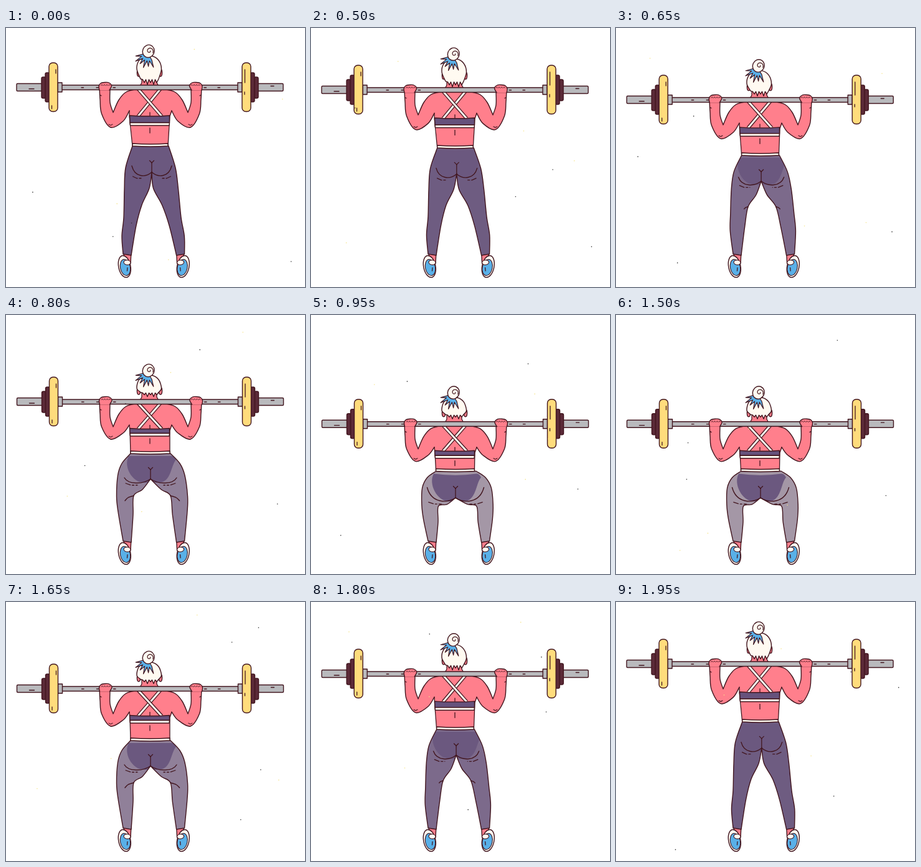
An HTML page with a canvas that plays this animation: 480 by 417 pixels, repeating every 2100 ms.

```html
<!DOCTYPE html>
<html lang="en">
<head>
<meta charset="utf-8">
<title>Barbell squat</title>
<style>
html, body { margin: 0; width: 100%; height: 100%; overflow: hidden; background: #fff; }
canvas { display: block; width: 480px; height: 417px; }
</style>
</head>
<body>
<canvas id="stage"></canvas>
<script>
const canvas = document.getElementById('stage');
const ctx = canvas.getContext('2d');
const ratio = window.devicePixelRatio || 1;
canvas.width = 480 * ratio;
canvas.height = 417 * ratio;

const INK = '#42161f', PINK = '#ff7f8c', CREAM = '#fffaf1', BLUE = '#59b0e8';
const GREY = '#b9babd', YELLOW = '#ffdc7c', PLATE = '#5b2a38', PURPLE = '#66527c';
const BAR_Y = 95.5, TRAVEL = 100, HALF = 0.44;
const BODY_AXIS = 232, BAR_AXIS = 231, FOOT_AXIS = 237.3;

// Depth of the squat for each held pose, top to bottom.
const DEPTHS = [0, 0.04, 0.2, HALF, 0.797, 1];

// Left leg outlines: waist to ankle outside, ankle to crotch inside.
const standing = {
  leg: [107, 88, 127], glute: [32, 10], crotch: [234, 232],
  outer: [203, 190, 192, 225, 190, 260, 189, 305, 186, 335, 188, 364],
  inner: [201, 366, 209, 318, 218, 285, 230, 258]
};
const halfway = {
  leg: [144, 128, 153], glute: [42, 2], crotch: [232, 264],
  outer: [200, 223, 186, 239, 179.5, 258, 177.5, 292, 180, 317, 188, 364],
  inner: [201, 366, 204, 322, 205, 291, 219, 281]
};
const deep = {
  leg: [179, 168, 176], glute: [48, 27], crotch: [232, 316],
  outer: [201, 272, 187, 278, 178, 293, 178, 315, 181, 338, 188, 364],
  inner: [201, 366, 204, 342, 204, 320, 218, 322]
};

function mix(a, b, t) {
  if (typeof a === 'number') return a + (b - a) * t;
  if (Array.isArray(a)) return a.map((v, i) => mix(v, b[i], t));
  return Object.fromEntries(Object.keys(a).map(k => [k, mix(a[k], b[k], t)]));
}

function polyline(path, p) {
  for (let i = 0; i < p.length; i += 2) path.lineTo(p[i], p[i + 1]);
  return path;
}
// Smooth curve through all points, joined to whatever the path holds.
function curve(path, p) {
  const n = p.length / 2;
  const at = i => { const k = Math.max(0, Math.min(n - 1, i)) * 2; return [p[k], p[k + 1]]; };
  path.lineTo(p[0], p[1]);
  for (let i = 0; i < n - 1; i++) {
    const [a, b, c, d] = [at(i - 1), at(i), at(i + 1), at(i + 2)];
    path.bezierCurveTo(b[0] + (c[0] - a[0]) / 6, b[1] + (c[1] - a[1]) / 6,
      c[0] - (d[0] - b[0]) / 6, c[1] - (d[1] - b[1]) / 6, c[0], c[1]);
  }
  return path;
}
function paint(path, fill, width = 1.4) {
  if (fill) { ctx.fillStyle = fill; ctx.fill(path); }
  if (width) { ctx.lineWidth = width; ctx.strokeStyle = INK; ctx.stroke(path); }
}
const poly = (p, fill, width) => { const s = polyline(new Path2D(), p); s.closePath(); paint(s, fill, width); };
const stroke = (p, width) => paint(curve(new Path2D(), p), null, width);
const line = (...p) => paint(polyline(new Path2D(), p), null, 1.3);
function box(x, y, w, h, r, fill) {
  const s = new Path2D();
  s.roundRect(x, y, w, h, r);
  paint(s, fill);
}
function oval(x, y, rx, ry, tilt, fill, width) {
  const s = new Path2D();
  s.ellipse(x, y, rx, ry, tilt, 0, 2 * Math.PI);
  paint(s, fill, width);
}
function bothSides(axis, draw) {
  draw();
  ctx.save();
  ctx.translate(2 * axis, 0);
  ctx.scale(-1, 1);
  draw();
  ctx.restore();
}
// The line of symmetry drifts from the hips to the feet.
function axisAt(y) {
  return mix(BODY_AXIS, FOOT_AXIS, Math.max(0, Math.min(1, (y - 225) / 140)));
}
function mirrored(p) {
  const out = [];
  for (let i = p.length - 2; i >= 0; i -= 2) out.push(2 * axisAt(p[i + 1]) - p[i], p[i + 1]);
  return out;
}

function foot() {
  poly([189, 360, 201, 360, 200, 379, 190, 379], PINK);
  oval(190.3, 384, 9.6, 17.8, -0.2, CREAM);
  oval(191.5, 385.5, 8, 13.2, -0.2, BLUE, 1.1);
  oval(194.5, 377.5, 5.5, 3.8, 0.15, CREAM, 1.2);
  line(195, 386, 194.5, 391);
}

function legs(pose, bend) {
  const rgb = c => `rgb(${c.map(Math.round)})`;
  const { outer, inner, crotch: [cx, cy], glute: [wide, high] } = pose;
  const [left, waist] = outer, right = 2 * BODY_AXIS - left - 1;

  const body = curve(new Path2D(), outer);
  curve(body, [...inner, cx, cy]);
  curve(body, [cx, cy, ...mirrored(inner)]);
  curve(body, mirrored(outer));
  body.closePath();
  paint(body, rgb(pose.leg), 0);

  const patch = new Path2D(), top = waist + 4;
  patch.moveTo(cx - 35, top);
  patch.bezierCurveTo(cx - 44, top + 16, cx - 30, cy + 6, cx - 10, cy + 6);
  patch.lineTo(cx + 12, cy + 6);
  patch.bezierCurveTo(cx + 34, cy + 6, cx + 32, top + 16, cx + 41, top + 6);
  patch.quadraticCurveTo(cx + 38, top, cx + 34, top);
  patch.quadraticCurveTo(cx, top + 8 * Math.max(0, bend - 1), cx - 35, top);
  ctx.save();
  ctx.clip(body);
  paint(patch, rgb(standing.leg), 0);
  ctx.restore();
  paint(body);

  for (const side of [-1, 1]) {
    const w = side * wide, fold = new Path2D();
    fold.moveTo(cx, cy);
    fold.bezierCurveTo(cx + 0.3 * w, cy + 9, cx + 0.85 * w, cy + 9, cx + w, cy - high);
    paint(fold);
    ctx.setLineDash([8, 3, 3, 3]);
    line(cx + 0.95 * w, cy + 7, cx + 0.75 * w, cy + 10, cx + 0.5 * w, cy + 10);
    ctx.setLineDash([]);
    line(cx, cy - 15, cx + side * 3.5, cy - 18.5);
  }
  line(cx, cy, cx, cy - 15);

  if (bend > 0.2 && bend <= 1) {
    const [x, y] = inner.slice(4);
    const crease = [x, y, x - 9 * bend, y + 3 * bend, x - 14 * bend, y + 8 * bend];
    stroke(crease);
    stroke(mirrored(crease));
  }

  const band = new Path2D();
  band.moveTo(left, waist - 4);
  band.quadraticCurveTo(BODY_AXIS, waist - 2, right, waist - 4);
  band.lineTo(right, waist);
  band.quadraticCurveTo(BODY_AXIS, waist + 2, left, waist);
  band.closePath();
  paint(band, CREAM);
}

function torso(squat, left, hip) {
  const right = 2 * BODY_AXIS - left - 1, lift = -4 * squat;
  poly([213, 97, 251, 97, 256, 102, 267, 134, 263, 142, right, hip, left, hip, 199, 142, 197, 134, 208, 102], PINK, 0);
  line(198, 133, 198 + squat, 142, left, hip);
  line(266, 133, 263, 142, right, hip);
  bothSides(BODY_AXIS, () => {
    const arm = curve(new Path2D(), [212, 98, 193, 103, 181, 116, 172, 136]);
    curve(arm, [172, 136, 167, 120, 167, 99]);
    curve(arm, [150, 96, 151, 115, 153.5, 138 + lift / 2, 168, 160 + lift, 188, 150 + lift, 198, 133]);
    paint(arm, PINK);
    stroke([165, 155 + lift, 168, 156.5 + lift, 171, 155 + lift], 1.1);
    line(151, 108, 153, 109);
  });
}

function bra(squat) {
  const top = 141 - 2.5 * squat, seam = 152.5 - 6 * squat, bottom = seam + 4.5;
  ctx.lineCap = 'butt';
  for (const side of [-1, 1]) {
    ctx.beginPath();
    ctx.moveTo(230 - side * 18, 98);
    ctx.lineTo(231 + side * 19, top + 1);
    ctx.strokeStyle = INK; ctx.lineWidth = 5.6; ctx.stroke();
    ctx.strokeStyle = CREAM; ctx.lineWidth = 3; ctx.stroke();
  }
  ctx.lineCap = 'round';
  line(231, top - 5, 231, top);
  poly([198.5, top, 215, top + 1, 247, top + 1, 262.5, top, 262.5, seam, 199, seam], PURPLE);
  poly([199, seam, 262.5, seam, 262, bottom, 199.5, bottom], CREAM);
  line(231, bottom + 4, 231, bottom + 12);
}

function head(squat) {
  const drop = 8 * squat, nape = 83 - 1.5 * squat;
  poly([219, 78, 242, 78, 242, 88, 247, 99, 213, 99, 218, 88], PINK, 0);
  line(218, 80, 218, 88, 213, 97);
  line(242, 80, 242, 88, 247, 97);
  for (const x of [213, 248]) oval(x, 72 + 0.75 * drop, 2.6, 6, 0, PINK);

  const hair = curve(new Path2D(), [216, nape - 1, 210, 66 + drop, 213, 53 + drop, 222, 46 + drop,
    234, 45 + drop, 245, 52 + drop, 249.5, 66 + drop, 245, nape - 1]);
  for (let i = 0; i < 5; i++) {
    const x = 242 - i * 5, length = (i % 2 ? 8 : 5) - 2 * squat;
    polyline(hair, [x, nape + length, x - 2.5, nape]);
  }
  hair.closePath();
  paint(hair, CREAM);

  ctx.save();
  ctx.translate(0, drop);
  const tuft = new Path2D();
  tuft.moveTo(227, 40);
  for (let i = 0; i < 6; i++) {
    const angle = Math.PI * (0.95 - 0.115 * i), reach = i % 2 ? 23 : 20;
    for (const [r, turn] of [[reach, 0], [11, -0.18]]) {
      tuft.lineTo(228 + r * Math.cos(angle + turn), 42 + r * Math.sin(angle + turn));
    }
  }
  tuft.closePath();
  paint(tuft, BLUE, 1.2);
  oval(228.7, 37.3, 9.3, 10.3, 0.4, CREAM);
  const swirl = new Path2D();
  for (let a = 0; a < 7; a += 0.2) {
    swirl.lineTo(230.5 + (1 + 0.75 * a) * Math.cos(a), 37 + (1 + 0.75 * a) * Math.sin(a));
  }
  paint(swirl, null, 1.2);
  ctx.restore();
}

function barbell() {
  box(89, 92, 285, 7.5, 0, GREY);
  bothSides(BAR_AXIS, () => {
    box(17, 89.5, 41, 12, 1.5, GREY);
    box(57, 79, 7, 34, 2.5, PLATE);
    box(63, 72, 7, 47, 2.5, PLATE);
    box(83, 88, 7, 15, 0, GREY);
    box(69, 56, 14, 78.5, 6, YELLOW);
  });
  line(80, 67, 80, 73);
  line(73.5, 125, 73.5, 130);
  line(383.5, 67, 383.5, 88);
  line(383, 103, 383, 107);
  line(37, 98, 45, 98);
  line(425, 93.5, 430, 93.5);
  for (const x of [121, 145, 172, 318, 340]) line(x, 96, x + 3.5, 96);
}

function fist() {
  const hand = curve(new Path2D(), [150, 100, 149, 94, 152, 89, 159, 87.5, 165, 88, 169.5, 93, 166, 100]);
  paint(hand, PINK);
  for (let x = 154; x < 168; x += 4) stroke([x - 1.5, 92.5, x, 91, x + 1, 92.5], 1);
}

function specks(seed) {
  const random = () => {
    seed = (seed * 16807) % 2147483647;
    return seed / 2147483647;
  };
  for (let i = 0; i < 8; i++) {
    ctx.fillStyle = i % 2 ? '#f5e48a' : '#333';
    ctx.beginPath();
    ctx.arc(15 + 450 * random(), 15 + 385 * random(), 0.8, 0, 2 * Math.PI);
    ctx.fill();
  }
}

function draw(depth, seed) {
  const bend = depth <= HALF ? depth / HALF : 1 + ((depth - HALF) / (1 - HALF)) ** 1.2;
  const pose = bend <= 1 ? mix(standing, halfway, bend) : mix(halfway, deep, bend - 1);
  const squat = Math.min(1, bend), shift = TRAVEL * depth;
  ctx.setTransform(ratio, 0, 0, ratio, 0, 0);
  ctx.fillStyle = '#fff';
  ctx.fillRect(0, 0, 480, 417);
  ctx.lineJoin = ctx.lineCap = 'round';
  bothSides(FOOT_AXIS, foot);
  ctx.save();
  ctx.translate(0, shift);
  torso(squat, pose.outer[0], pose.outer[1] - shift);
  bra(squat);
  head(squat);
  ctx.restore();
  legs(pose, bend);
  ctx.save();
  ctx.translate(0.5 * squat, shift);
  barbell();
  bothSides(BODY_AXIS, fist);
  ctx.restore();
  specks(seed);
}

// Hold at the top, step down, hold at the bottom, step back up.
function poseIndex(time) {
  if (time < 500) return 0;
  if (time < 1500) return Math.min(5, 1 + Math.floor((time - 500) / 150));
  return 4 - Math.floor((time - 1500) / 150);
}

function tick() {
  const time = performance.now() % 2100, index = poseIndex(time);
  draw(DEPTHS[index], 7919 * (index + 1 + (time < 1500 ? 0 : 10)));
  requestAnimationFrame(tick);
}
tick();
</script>
</body>
</html>
```
